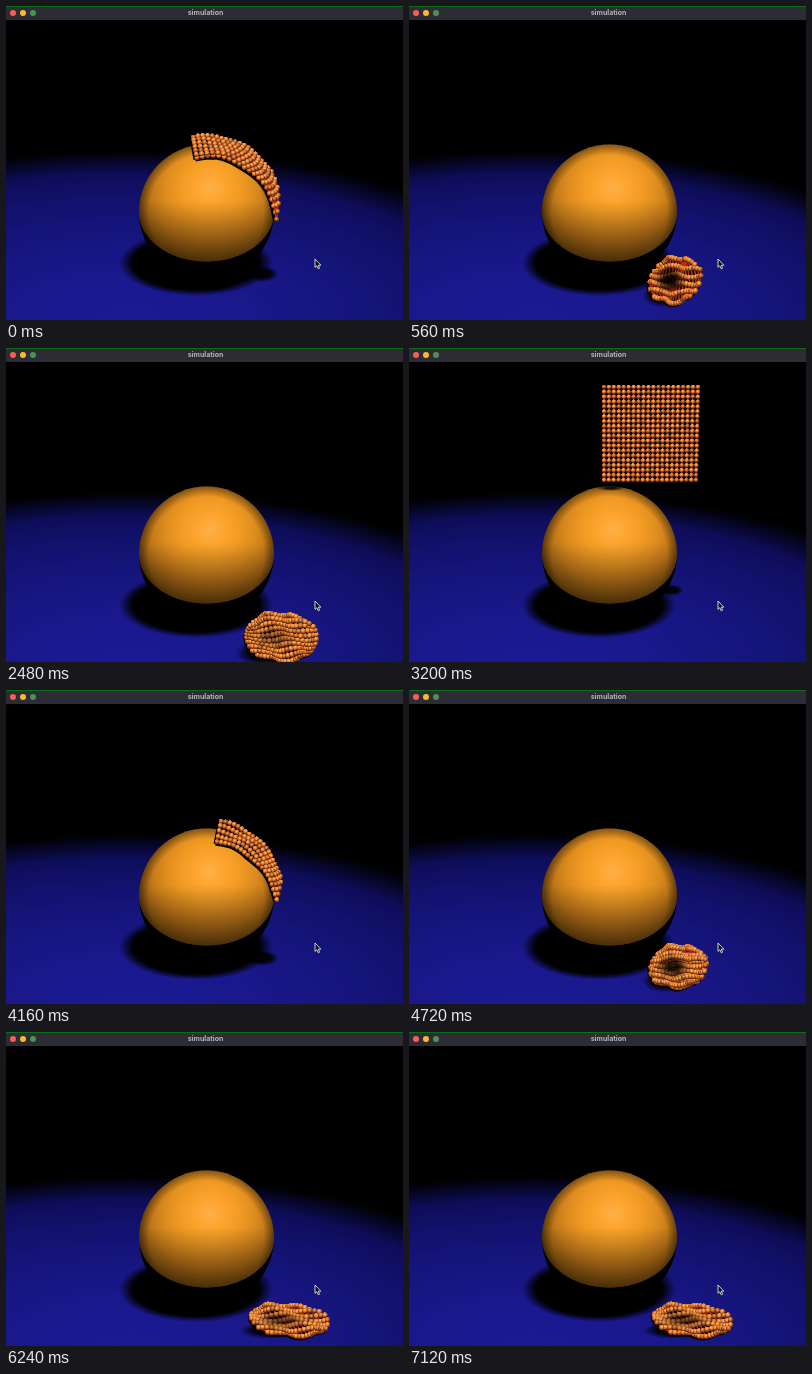
Recreate the animation shown at these times as an HTML page with a canvas. Size 397x314 px, loop 7200 ms.

```html
<!DOCTYPE html>
<html lang="en">
<head>
<meta charset="utf-8">
<title>simulation</title>
<style>
  html, body { margin: 0; width: 100%; height: 100%; overflow: hidden; background: #000; }
  #stage { position: relative; width: 397px; height: 314px; overflow: hidden; }
  canvas { position: absolute; left: 0; top: 0; display: block; }
  .bar { position: absolute; left: 0; top: 0; width: 397px; height: 14px; background: #2c2d34;
    border-top: 1px solid #0b6d16; box-sizing: border-box; }
  .bar b { position: absolute; left: 0; width: 399px; top: 0; text-align: center; color: #b4b4b9;
    font: bold 7px/12px Inter, "Liberation Sans", sans-serif; }
  .bar i { position: absolute; top: 3px; width: 6px; height: 6px; border-radius: 50%; }
  svg { position: absolute; left: 308px; top: 252px; }
</style>
</head>
<body>
<div id="stage">
  <canvas id="view" width="397" height="314"></canvas>
  <div class="bar">
    <i style="left:4px;background:#fb5d56"></i>
    <i style="left:14px;background:#f9bb2e"></i>
    <i style="left:24px;background:#4f8f54"></i>
    <b>simulation</b>
  </div>
  <svg width="8" height="13" viewBox="0 0 8 13">
    <path d="M1 1V9.4L2.9 7.7L4.2 10.8L5.6 10.2L4.3 7.2H6.8Z" fill="#0a0a0a" stroke="#e4e4ea" stroke-width=".9"/>
  </svg>
</div>
<script>
const W = 397, H = 314, N = 20, LOOP = 7200, STEP = 80;
const BALL = { x: 200.5, y: 206, r: 67.5 };
const ctx = document.getElementById('view').getContext('2d');
const lerp = (a, b, k) => a + (b - a) * k;

function layer(w, h, paint) {
  const c = document.createElement('canvas');
  c.width = w;
  c.height = h;
  paint(c.getContext('2d'));
  return c;
}

// Evenly spaced colours from the centre outwards
function radial(g, x, y, r, colors) {
  const grad = g.createRadialGradient(x, y, 0, x, y, r);
  colors.forEach((color, i) => grad.addColorStop(i / (colors.length - 1), color));
  return grad;
}

// Soft-edged black ellipse; core is the solid part of the radius
function blob(g, x, y, rx, ry, core, alpha) {
  g.save();
  g.translate(x, y);
  g.scale(rx, ry);
  const grad = g.createRadialGradient(0, 0, core, 0, 0, 1);
  grad.addColorStop(0, `rgba(0,0,0,${alpha})`);
  grad.addColorStop(1, 'rgba(0,0,0,0)');
  g.fillStyle = grad;
  g.beginPath();
  g.arc(0, 0, 1, 0, 7);
  g.fill();
  g.restore();
}

const floor = layer(W, H, g => {
  g.fillStyle = '#000';
  g.fillRect(0, 0, W, H);
  g.save();
  g.translate(125, 314);
  g.scale(1, 170 / 420);
  g.fillStyle = radial(g, 0, 0, 420,
    ['#1c1a92', '#1b1990', '#1a188b', '#181683', '#151479', '#12116c', '#0e0d5a', '#000']);
  g.fillRect(-125, -430, W, 430);
  g.restore();
  blob(g, 190, 257, 77, 33, .82, 1);
});

const ball = layer(W, H, g => {
  const { x, y, r } = BALL;
  g.fillStyle = '#000';
  g.beginPath();
  g.arc(x, y, r, 0, 7);
  g.fill();
  // Lit part: upper half circle, flatter terminator below
  g.beginPath();
  g.arc(x, y, r, Math.PI, 0);
  g.ellipse(x, y, r, 49.5, 0, 0, Math.PI);
  g.clip();
  g.fillStyle = radial(g, 204, 182, 86,
    ['#ffb04a', '#fda52f', '#f39c24', '#e08e1f', '#c67b1a', '#996013', '#5a390a']);
  g.fillRect(0, 0, W, H);
  const low = g.createLinearGradient(0, 195, 0, 256);
  low.addColorStop(0, 'rgba(0,0,0,0)');
  low.addColorStop(1, 'rgba(0,0,0,.5)');
  g.fillStyle = low;
  g.fillRect(0, 0, W, H);
  blobRim(g, x, y, r);
});

function blobRim(g, x, y, r) {
  const rim = g.createRadialGradient(x, y, r * .85, x, y, r);
  rim.addColorStop(0, 'rgba(0,0,0,0)');
  rim.addColorStop(1, 'rgba(0,0,0,.4)');
  g.fillStyle = rim;
  g.fillRect(0, 0, W, H);
}

const beads = [['#ffbd7c', '#e5812d', '#702c0e'], ['#f0a463', '#c96a26', '#55220b'], ['#e0ab88', '#a86033', '#45200c']]
  .map(colors => layer(24, 24, g => {
    g.fillStyle = radial(g, 11, 8, 14, colors);
    g.beginPath();
    g.arc(12, 12, 12, 0, 7);
    g.fill();
  }));

// Lays out the cloth with place(u, v); legs is the number of rows per pleat
function pose(place, legs, { size = 2.5, shade, hole = [200, 206, 1, 1], dark = 0 }) {
  const dots = Array.from({ length: N * N }, (_, i) => {
    const row = i / N | 0;
    const v = legs ? 1 - Math.abs(row % (2 * legs) - legs) / legs : row / (N - 1);
    return place(i % N / (N - 1), v);
  });
  return { dots, size, shade, hole, dark };
}

// Hanging square, slightly narrower at the bottom
const sheet = pose((u, v) => [195 + u * (94 - 2 * v), 39 + 93 * v], 0,
  { size: 2.2, shade: [262, 242, 13, 6], hole: [202, 140, 15, 3], dark: .85 });

// Strip wrapped over the ball from one angle to another, its outer edge lagging behind
function wrap(from, to, lag, legs) {
  return pose((u, v) => {
    const a = (lerp(from, to, u) - lag * u * (1 - v)) * Math.PI / 180;
    const r = lerp(76, 56 + 15 * u * u, v) + .8 * Math.sin(u * 13 + v * 5);
    return [BALL.x + r * Math.cos(a), BALL.y + r * Math.sin(a)];
  }, legs, { shade: [256, 268, 17, 8] });
}

// Square pressed into a lumpy oval
function heap(x, y, rx, ry, skew, legs, dark) {
  return pose((u, v) => {
    const a = 2 * u - 1, b = 2 * v - 1;
    const px = a * Math.sqrt(1 - b * b / 2), py = b * Math.sqrt(1 - a * a / 2);
    return [
      x + rx * px + skew * py + 1.5 * Math.sin(u * 13 + v * 5),
      y + ry * py + 1.5 * Math.cos(u * 11 - v * 6)
    ];
  }, legs, {
    size: 2.7, dark,
    shade: [x - rx * .5, y + ry * .7, rx * .8, ry * .55],
    hole: [x - rx * .2, y, rx * .65, ry * .6]
  });
}

const draped = wrap(-100, 6, 38, 6);
const sliding = wrap(-79, 3, 18, 4);
const landed = heap(266, 274, 25, 22, -2, 5, .9);
const spread = heap(275, 289, 35, 23, 4, 9, .3);
const rest = heap(283, 288, 38, 15, 10, 6, .5);

// [time, pose, power of the easing that leads here]
const keys = [
  [0, draped, 1], [560, landed, 1.5], [960, spread, .7], [3160, spread, 1],
  [3160, sheet, 1], [3200, sheet, 1], [4160, sliding, 1.3],
  [4680, landed, 1.5], [5120, rest, .7], [LOOP, rest, 1]
];

function drawLinks(dots, color, width, dx, dy) {
  const link = (a, b) => {
    if (Math.hypot(a[0] - b[0], a[1] - b[1]) > 11) return;
    ctx.moveTo(a[0] + dx, a[1] + dy);
    ctx.lineTo(b[0] + dx, b[1] + dy);
  };
  ctx.strokeStyle = color;
  ctx.lineWidth = width;
  ctx.beginPath();
  dots.forEach((d, i) => {
    if (i % N < N - 1) link(d, dots[i + 1]);
    if (i + N < dots.length) link(d, dots[i + N]);
  });
  ctx.stroke();
}

function drawCloth(dots, size) {
  drawLinks(dots, '#0a0402', 4, -1.5, 2);
  drawLinks(dots, '#b82c18', 1.5, 0, 0);
  dots.forEach(([x, y], i) => {
    const c = i % N, r = i / N | 0;
    const tone = (c * 7 + r * 3) % 11 === 0 ? 2 : (c * 3 + r * 5) % 4 === 0 ? 1 : 0;
    ctx.drawImage(beads[tone], x - size, y - size, 2 * size, 2 * size);
  });
}

function draw(t) {
  let n = 1;
  while (n < keys.length - 1 && keys[n][0] <= t) n++;
  const [t0, a] = keys[n - 1], [t1, b, power] = keys[n];
  const k = t1 > t0 ? Math.pow((t - t0) / (t1 - t0), power) : 1;
  const mix = (p, q) => p.map((v, i) => lerp(v, q[i], k));
  ctx.drawImage(floor, 0, 0);
  blob(ctx, ...mix(a.shade, b.shade), .5, .95);
  ctx.drawImage(ball, 0, 0);
  drawCloth(a.dots.map((d, i) => mix(d, b.dots[i])), lerp(a.size, b.size, k));
  blob(ctx, ...mix(a.hole, b.hole), .3, lerp(a.dark, b.dark, k));
}

function tick() {
  const t = performance.now() % LOOP;
  draw(Math.floor(t / STEP) * STEP);
  requestAnimationFrame(tick);
}
tick();
</script>
</body>
</html>
```
